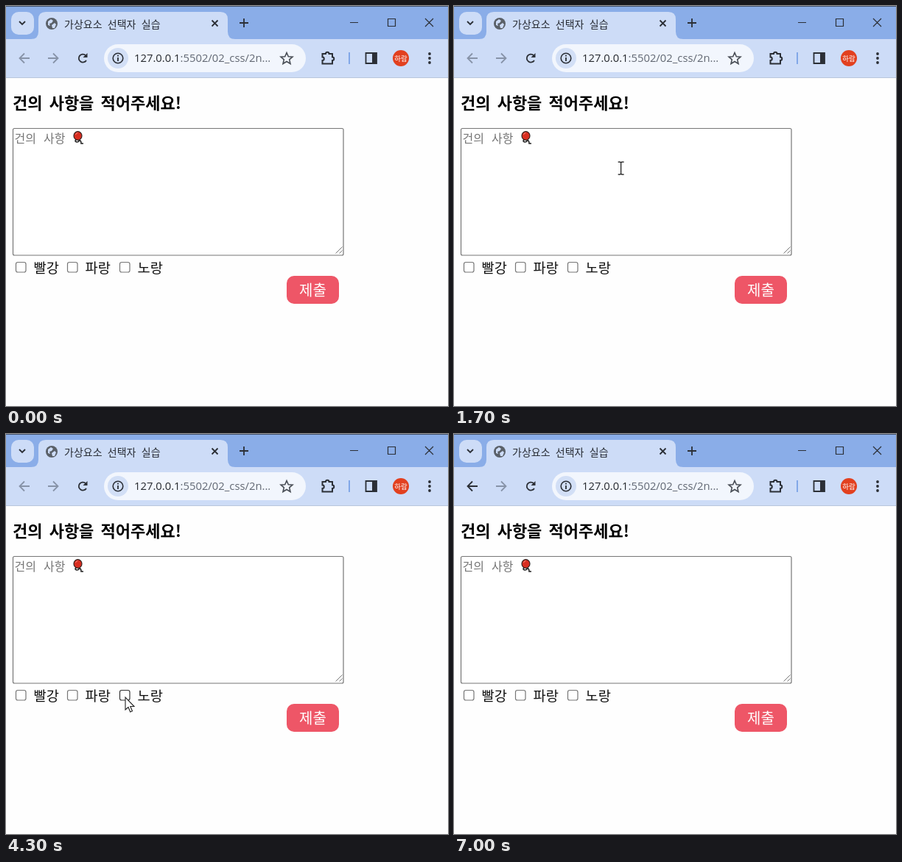
Write an HTML page that moves like this. It is 600x544 px and loops after 7.1 s.

```html
<!DOCTYPE html>
<html lang="ko">
<head>
<meta charset="utf-8">
<style>
html, body { margin: 0; width: 100%; height: 100%; overflow: hidden; background: #fefefe; }
svg { display: block; font-family: "Noto Sans CJK KR", "Noto Sans CJK", sans-serif; }
.line { fill: none; stroke: #2b2f36; stroke-width: 1.8; }
.thin { stroke-width: 1.2; }
#title { font: 700 22px "Noto Sans CJK KR", "Noto Sans CJK", sans-serif; word-spacing: 3px; }
#url { font: 14.8px "Open Sans", sans-serif; }
</style>
</head>
<body>
<svg width="600" height="544" viewBox="0 0 600 544">
  <!-- window frame and tab -->
  <rect width="600" height="46" fill="#8aade8"/>
  <rect width="600" height="1" fill="#46556f"/>
  <rect y="45" width="600" height="52" fill="#cddcf7"/>
  <rect y="97" width="600" height="1" fill="#b9c6dc"/>
  <path d="M34 45q10 0 10-10V18q0-10 10-10H291q10 0 10 10V35q0 10 10 10z" fill="#cddcf7"/>
  <rect x="7" y="8" width="31" height="31" rx="10" fill="#cddcf7"/>
  <path class="line" d="M18 21l4 4 4-4"/>
  <circle cx="62" cy="24" r="8" fill="#5a6068"/>
  <path d="M57 21l4-3 3 2-2 3-3 1 1 3-3-1zM62 26l4-3 2 2-2 5-3 0z" fill="#cddcf7"/>
  <text x="79" y="30" font-size="14" word-spacing="3.4" fill="#272b33">가상요소 선택자 실습</text>
  <path class="line" d="M279.500 19.500l8 8m0-8l-8 8M317 23h12M323 17v12"/>
  <path class="line thin" d="M467 22.500h11M518.500 17.500h10v10h-10zM569 17l11 11m0-11l-11 11"/>

  <!-- toolbar -->
  <path id="back" class="line" d="M32 71H19M25 64.500L18.500 71l6.500 6.500"/>
  <path class="line" style="stroke:#8793a8" d="M57 71h13M64 64.500l6.500 6.500-6.500 6.500"/>
  <path class="line" d="M109 74a5.500 5.500 0 1 1-1-7"/>
  <path d="M110.500 64v6h-6z" fill="#2b2f36"/>
  <rect x="133" y="52" width="274" height="38" rx="19" fill="#f2f6fd"/>
  <circle cx="152" cy="71" r="14" fill="#d2dff6"/>
  <circle class="line" cx="152" cy="71" r="6.800" style="stroke-width:1.6"/>
  <path class="line" d="M152 70v5M152 66.800v1.700"/>
  <text id="url" x="174" y="76" fill="#25282d">127.0.0.1<tspan fill="#626873">:5502/02_css/2n...</tspan></text>
  <path class="line" style="stroke:#484d55;stroke-width:1.6" d="M381 63.500l2.300 5.200 5.700.5-4.300 3.700 1.300 5.600-5-3-5 3 1.300-5.600-4.300-3.700 5.700-.5z"/>
  <path class="line" style="stroke-width:2" d="M429.500 65h4.500a2.200 2.200 0 0 1 4.500 0h4.500v4.500a2.200 2.200 0 0 1 0 4.500v4.500h-13.500v-4.500a2.200 2.200 0 0 0 0-4.500z"/>
  <path d="M466 63v16" stroke="#82a8e8" stroke-width="2"/>
  <path class="line" d="M488.500 64h14.500v14h-14.500z"/>
  <path d="M497 64h6v14h-6z" fill="#2b2f36"/>
  <circle cx="536" cy="71" r="11" fill="#e2401f"/>
  <text x="536" y="74.500" font-size="9.500" text-anchor="middle" fill="#fff">하람</text>
  <g fill="#2b2f36"><circle cx="575" cy="65" r="1.900"/><circle cx="575" cy="71" r="1.900"/><circle cx="575" cy="77" r="1.900"/></g>

  <!-- page -->
  <rect id="bar" x="9" y="119" width="582" height="27"/>
  <text id="title" x="9" y="140">건의 사항을 적어주세요!</text>
  <rect id="area" rx="2"/>
  <path d="M447.500 336.500l9-9M452.500 336.500l4-4" stroke="#777"/>
  <text x="11.500" y="186" font-size="16" font-weight="300" word-spacing="5.500" fill="#757575">건의 사항</text>
  <path d="M96 181q-4 3 0 4 3 0 3-2 3-1 3 4h3" fill="none" stroke="#222" stroke-width="1.600"/>
  <ellipse cx="97.500" cy="176.500" rx="5.500" ry="5.800" fill="#d92d20" stroke="#33211f" stroke-width="1.200"/>
  <path d="M94.500 175q1-2.500 3-2.500" fill="none" stroke="#f4897d"/>
  <g id="options"></g>
  <rect id="button" x="381" y="367" width="71" height="38" rx="10"/>
  <text x="416.500" y="393.500" font-size="20" text-anchor="middle" fill="#fff">제출</text>

  <path id="arrow" d="M0 0v17l4-3.500 2.700 6.500 2.800-1.200-2.700-6.300H12z" fill="#fff" stroke="#222" stroke-width="1.100"/>
  <path id="beam" d="M-4-8.500h3l1 1 1-1h3M0-7.500v15M-4 8.500h3l1-1 1 1h3" fill="none" stroke="#111" stroke-width="1.200"/>
</svg>
<script>
const LOOP = 7100, STEP = 100;
const $ = id => document.getElementById(id);
const set = (el, attrs) => { for (const k in attrs) el.setAttribute(k, attrs[k]); };
const inside = (p, x, y, w, h) => p.x >= x && p.x < x + w && p.y >= y && p.y < y + h;
const during = (t, from, to) => t >= from && t < to;

// pointer stops: time, x, y
const stops = [
  [500, 600, 290], [900, 320, 170], [1000, 250, 140], [1200, 175, 149], [1300, 190, 142],
  [1500, 220, 162], [1800, 230, 250], [2000, 190, 270], [2300, 47, 359], [2500, 47, 357],
  [2900, 58, 355], [3300, 92, 356], [3700, 92, 357], [4000, 161, 357], [4300, 162, 358],
  [4400, 180, 364], [4800, 424, 426], [5000, 400, 420], [5300, 180, 142], [5500, 122, 132],
  [5600, 150, 160], [6100, 410, 398], [6200, 415, 388], [6500, 415, 388], [6800, 438, 402]
];

function pointer(t) {
  const i = stops.findIndex(s => s[0] > t);
  if (i < 1) return { x: -50, y: -50 };
  const [t0, x0, y0] = stops[i - 1], [t1, x1, y1] = stops[i];
  const k = (t - t0) / (t1 - t0);
  return { x: x0 + (x1 - x0) * k, y: y0 + (y1 - y0) * k };
}

const options = [
  { name: '빨강', x: 13.5, color: '#f00', on: 2500, off: 2800 },
  { name: '파랑', x: 83.5, color: '#00f', on: 3400, off: 3700 },
  { name: '노랑', x: 154.5, color: '#e6c800', on: 4000, off: 4200 }
];
for (const o of options) {
  const g = document.createElementNS('http://www.w3.org/2000/svg', 'g');
  g.innerHTML = `<rect x="${o.x}" y="348.500" width="13.500" height="13.500" rx="2.500" stroke-width="1.200"/>
    <path d="M${o.x + 3} 355.500l3 3 5-6.500" fill="none" stroke="#fff" stroke-width="2"/>
    <text x="${o.x + 24}" y="362.500" font-size="18.700">${o.name}</text>`;
  $('options').append(g);
  [o.box, o.tick, o.label] = g.children;
}

function draw(t) {
  const p = pointer(t);
  const onTitle = inside(p, 9, 118, 582, 32);
  const text = onTitle || inside(p, 9, 167, 449, 172);
  set($('bar'), { visibility: onTitle ? 'visible' : 'hidden' });
  set($('title'), { fill: onTitle ? '#fff' : '#000' });

  const focus = during(t, 1800, 2400);
  set($('area'), focus
    ? { x: 10, y: 167.5, width: 447.5, height: 170.5, fill: '#fdeced', stroke: '#111', 'stroke-width': 2 }
    : { x: 9.5, y: 166.5, width: 448.5, height: 172.5, fill: '#fff', stroke: '#767676', 'stroke-width': 1.2 });

  for (const o of options) {
    const checked = during(t, o.on, o.off);
    const hover = inside(p, o.x, 345, 60, 22);
    set(o.box, { fill: checked ? '#0075ff' : '#fff', stroke: checked ? '#0075ff' : hover ? '#333' : '#767676' });
    set(o.tick, { visibility: checked ? 'visible' : 'hidden' });
    set(o.label, { fill: checked ? o.color : '#111' });
  }
  set($('button'), { fill: inside(p, 381, 367, 71, 38) ? '#e04a5c' : '#ee5667' });
  $('back').style.stroke = t >= 6500 ? '#2b2f36' : '#8793a8';

  const place = `translate(${p.x} ${p.y})`;
  set($('arrow'), { transform: place, visibility: text ? 'hidden' : 'visible' });
  set($('beam'), { transform: place, visibility: text ? 'visible' : 'hidden' });
}

function tick() {
  draw(Math.floor(performance.now() % LOOP / STEP) * STEP);
  requestAnimationFrame(tick);
}
tick();
</script>
</body>
</html>
```
